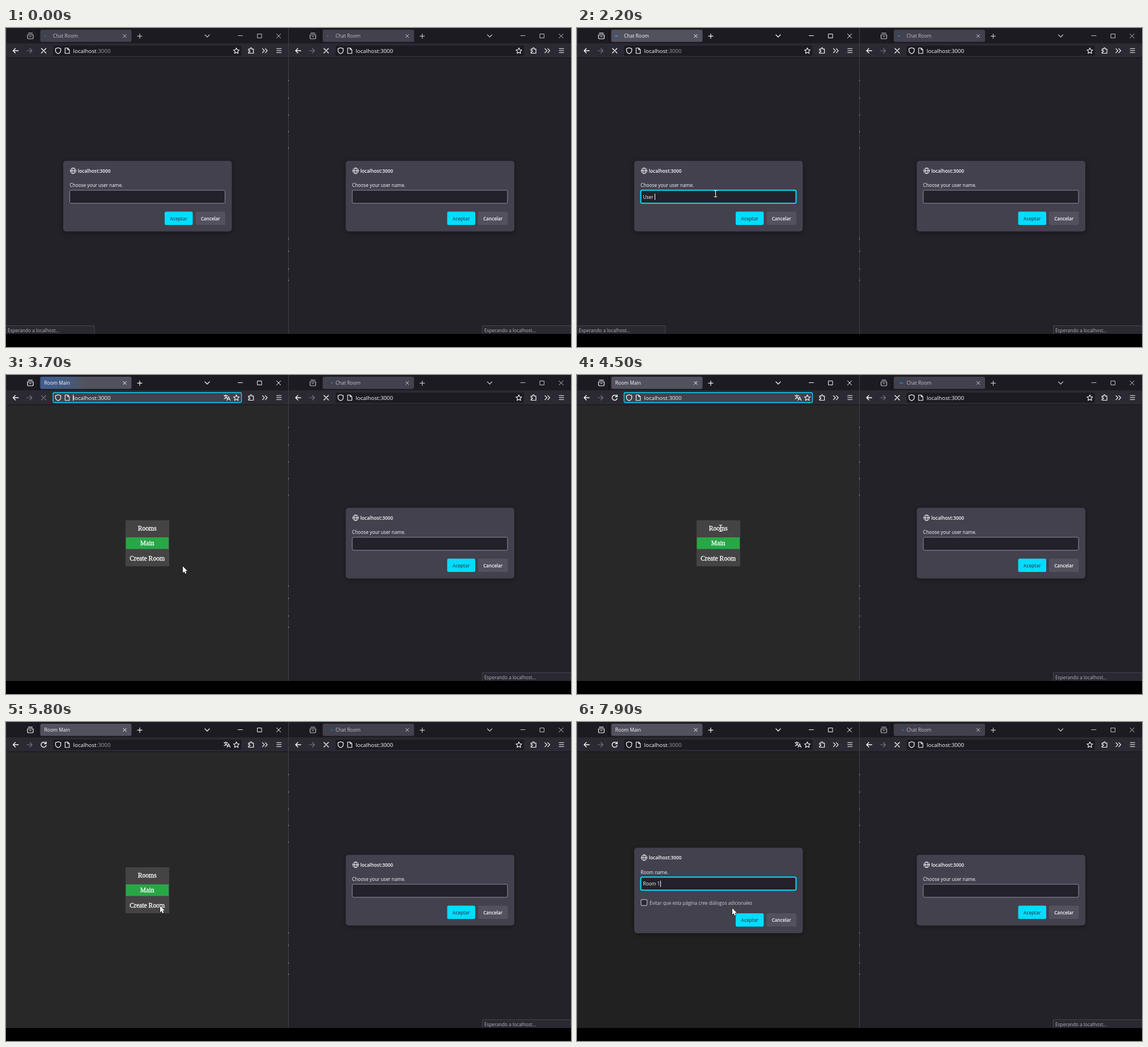
Recreate the animation shown at these times as an HTML page with a canvas. Size 997 by 562 pixels, loop 8000 ms.

```html
<!DOCTYPE html>
<html lang="en">
<head>
<meta charset="utf-8">
<title>Chat Room</title>
<style>
html, body { margin: 0; width: 100%; height: 100%; overflow: hidden; background: #000; }
canvas { display: block; }
</style>
</head>
<body>
<canvas id="stage" width="997" height="562"></canvas>
<script>
const ctx = document.getElementById('stage').getContext('2d');
const LOOP = 8000, RIGHT = 498.5;
const SANS = '"Open Sans", "Noto Sans", sans-serif', SERIF = '"Liberation Serif", serif';
const WHITE = '#fbfbfe', CYAN = '#00ddff', PANEL = '#42414d';

// Key moments, in ms
const ACTIVE = 1600, ENTER = 3700, IDLE = 4000, BLUR = 5700, PROMPT = 5950;
const userKeys = [['U', 1800], ['s', 1900], ['e', 2000], ['r', 2100], [' ', 2200], ['1', 2400]];
const roomKeys = [['R', 6500], ['o', 6700], ['o', 6800], ['m', 7000], [' ', 7200], ['1', 7500]];
const mousePath = [
  [100, 914, 508], [1000, 585, 308], [1500, 244, 292], [2400, 244, 292], [2800, 314, 342],
  [3300, 314, 342], [3700, 312, 337], [3900, 312, 337], [4350, 253, 270], [4700, 253, 270],
  [5350, 272, 324], [6000, 272, 324], [6500, 274, 328], [8000, 274, 328]
];

function rect(x, y, w, h, fill) {
  ctx.fillStyle = fill;
  ctx.fillRect(x, y, w, h);
}

function box(x, y, w, h, r, fill, line, width = 1) {
  ctx.beginPath();
  ctx.roundRect(x, y, w, h, r);
  if (fill) { ctx.fillStyle = fill; ctx.fill(); }
  if (line) { ctx.strokeStyle = line; ctx.lineWidth = width; ctx.stroke(); }
}

function text(str, x, y, size, color = WHITE, weight = 400, family = SANS, align = 'left') {
  ctx.font = `${weight} ${size}px ${family}`;
  ctx.textAlign = align;
  ctx.fillStyle = color;
  ctx.fillText(str, x, y);
  return ctx.measureText(str).width;
}

function icon(path, x, y, color = WHITE, width = 1.2, fill) {
  const shape = new Path2D(path);
  ctx.save();
  ctx.translate(x, y);
  ctx.lineWidth = width;
  ctx.lineCap = ctx.lineJoin = 'round';
  ctx.strokeStyle = color;
  ctx.stroke(shape);
  if (fill) { ctx.fillStyle = fill; ctx.fill(shape); }
  ctx.restore();
}

const CROSS = 'M-4-4L4 4M4-4L-4 4';
const SMALL_CROSS = 'M-2.7-2.7L2.7 2.7M2.7-2.7L-2.7 2.7';
const ARROW_LEFT = 'M4.7 0H-4.5M-.5-4L-4.5 0-.5 4';
const ARROW_RIGHT = 'M-4.7 0H4.5M.5-4L4.5 0 .5 4';
const RELOAD = 'M4.3 1.2A4.5 4.5 0 1 1 3.4-3M4.4-5V-1.6H1';
const SHIELD = 'M0-5.2L4.6-3.6V-.5C4.6 2.5 2.4 4.4 0 5.3-2.4 4.4-4.6 2.5-4.6-.5V-3.6Z';
const PAGE = 'M-3.7-4.8H.8L3.8-1.8V4.8H-3.7ZM.8-4.8V-1.8H3.8';
const STAR = 'M0-5L1.5-1.7 5.1-1.3 2.4 1.1 3.2 4.7 0 2.9-3.2 4.7-2.4 1.1-5.1-1.3-1.5-1.7Z';
const PUZZLE = 'M-4.3-2.7H-1.4V-3.5A1.4 1.4 0 0 1 1.4-3.5V-2.7H4.3V4.7H-4.3V2.6H-3.2A1.4 1.4 0 0 0-3.2-.2H-4.3Z';
const GLOBE = 'M-5 0A5 5 0 1 1 5 0A5 5 0 1 1-5 0H5M0-5C-3.2-2-3.2 2 0 5C3.2 2 3.2-2 0-5';
const TRANSLATE = 'M-5.5-3.6H1.3M-2.2-5V-3.6M.2-3.4C-.5-.8-2.8 1.3-5.2 2.2M-4.2-3.2C-3.2-.8-1.6.7.2 1.5M0 5L2.8-1.6 5.6 5M1 2.9H4.7';
const POINTER = 'M0 0V11.4L2.6 9.1 4.3 13 6.3 12.1 4.6 8.3H8.1Z';
const IBEAM = 'M-2.5-5.5H2.5M0-5.5V5.5M-2.5 5.5H2.5';

const typed = (keys, t) => keys.filter(k => t >= k[1]).map(k => k[0]).join('');
const caretOn = (t, since) => (t - since) % 1000 < 500;
const lastKey = (keys, t, start) => keys.reduce((m, k) => t >= k[1] ? k[1] : m, start);

function throbber(t, color) {
  const a = t / 1050 * 2 * Math.PI;
  const w = 2.4 + 4.4 * Math.abs(Math.sin(a));
  box(72.8 - 4 * Math.cos(a) - w / 2, 12.8, w, 2.4, 1.2, color);
}

function chrome(t, s) {
  rect(0, 0, 498.5, 27, '#1c1b22');
  rect(0, 27, 498.5, 25, '#2b2a33');
  rect(0, 52, 498.5, 1, '#15141a');
  rect(56, 0, 1, 27, '#0f0e14');

  const soft = s.active ? WHITE : '#c2c2c9';
  icon('M-5-2H5V3.6Q5 5 3.6 5H-3.6Q-5 5-5 3.6ZM-3.6-4.8H3.6M-1.6 1H1.6', 43, 14, soft);
  box(60.5, 3, 161, 21.5, 3, s.active ? '#52525e' : PANEL);
  if (s.loading) {
    throbber(t, s.active ? '#2f8cff' : '#1677c2');
    text('Chat Room', 83, 17.3, 8.5, s.active ? WHITE : '#c3c3ca');
  } else {
    const glow = Math.max(0, 1 - (t - ENTER) / 350);
    const fade = ctx.createLinearGradient(61, 0, 140, 0);
    fade.addColorStop(0, `rgba(45,105,190,${.5 * glow})`);
    fade.addColorStop(.6, `rgba(45,105,190,${.35 * glow})`);
    fade.addColorStop(1, 'rgba(45,105,190,0)');
    box(60.5, 3, 161, 21.5, 3, fade);
    text('Room Main', 67.5, 17.3, 8.5);
  }
  icon(SMALL_CROSS, 209.5, 14, soft, 1);
  icon('M-4 0H4M0-4V4', 236, 14.3, soft);
  icon('M-4-2L0 2 4-2', 355, 14, soft);
  icon('M-4 0H4', 413.5, 13.5, soft, 1);
  icon('M-3.5-3.5H3.5V3.5H-3.5Z', 447.5, 14, soft, 1);
  icon('M-3.7-3.7L3.7 3.7M3.7-3.7L-3.7 3.7', 481, 14, soft, 1);

  icon(ARROW_LEFT, 17, 40, WHITE, 1.4);
  icon(ARROW_RIGHT, 41.5, 40, '#74737d', 1.2);
  if (s.loading) icon(CROSS, 66.5, 40, WHITE, 1.4);
  else if (t < IDLE) icon(CROSS, 66.5, 40, '#77767f', 1.2);
  else icon(RELOAD, 66.5, 40, WHITE, 1.4);

  if (s.urlFocus) box(83, 31, 332.5, 17.5, 2.5, PANEL, CYAN, 1.3);
  else box(83, 31, 332.5, 18, 2.5, '#1c1b22');
  icon(SHIELD, 92, 40);
  icon(PAGE, 108, 40, WHITE, 1.1);
  const hostWidth = text('localhost', 118.5, 43.5, 9.8);
  text(':3000', 118.5 + hostWidth, 43.5, 9.8, s.dimPort ? '#9b9aa4' : WHITE);
  if (s.urlFocus && caretOn(t, ENTER)) rect(118, 34.5, 1, 11, WHITE);
  if (!s.loading) icon(TRANSLATE, 390, 39.8, WHITE, 1.1);
  icon(STAR, 406.5, 40, WHITE, 1.1);
  icon(PUZZLE, 432.3, 39.8);
  icon('M-4.2-3.6L-.7 0-4.2 3.6M.8-3.6L4.3 0 .8 3.6', 456.7, 40);
  icon('M-4-3.5H4M-4 0H4M-4 3.5H4', 481.7, 39.8, WHITE, 1.1);
}

function button(label, x, y, w, fill, color) {
  box(x, y, w, 23.5, 2.5, fill);
  text(label, x + w / 2, y + 15.2, 8.1, color, 600, SANS, 'center');
}

function dialog(t, d) {
  const y = d.y;
  ctx.save();
  ctx.shadowColor = 'rgba(0,0,0,.4)';
  ctx.shadowBlur = 9;
  ctx.shadowOffsetY = 2;
  box(101, y, 297.5, d.h, 5, PANEL);
  ctx.restore();
  icon(GLOBE, 118.5, y + 17.5, WHITE, 1);
  text('localhost:3000', 126.7, y + 20.8, 8.35, WHITE, 600);
  text(d.label, 112.3, y + 46.3, 8.26);
  box(112.5, y + 51.8, 274, 23, 2.5, '#23222b', d.focus ? CYAN : '#8f8f9d', d.focus ? 2 : 1);
  if (d.focus) {
    const value = typed(d.keys, t);
    const w = text(value, 116.5, y + 66.7, 8.3);
    if (caretOn(t, lastKey(d.keys, t, d.since))) rect(Math.round(116.8 + w), y + 58, 1, 11, WHITE);
  }
  if (d.check) {
    box(113, y + 91.3, 10.5, 10.5, 1.5, '#2b2a33', '#b6b5c0', 1.2);
    text('Evitar que esta página cree diálogos adicionales', 128, y + 100, 8.2, '#cfcfd6');
  }
  const by = y + d.h - 35;
  button('Aceptar', 280, by, 49.5, d.hover ? '#80ebff' : CYAN, d.hover ? '#2b3b48' : '#2f4b5a');
  button('Cancelar', 334.5, by, 52.5, '#52515d', WHITE);
}

function status(x) {
  box(x - .5, 524.5, 156.5, 15, 0, '#2a2932', '#45444f');
  text('Esperando a localhost...', x + 3, 535.6, 8.25, '#b3b2ba');
}

function menu() {
  rect(211, 256, 77, 81, '#444444');
  rect(211.5, 286, 75.5, 20.5, '#28a745');
  [['Rooms', 273.8], ['Main', 300.2], ['Create Room', 326.6]].forEach(([label, y]) => {
    text(label, 249.2, y, 11.7, '#fff', 400, SERIF, 'center');
    ctx.strokeStyle = '#fff';
    ctx.lineWidth = .3;
    ctx.strokeText(label, 249.2, y);
  });
}

function mouse(t) {
  if (t < mousePath[0][0]) return;
  const i = Math.max(1, mousePath.findIndex(p => p[0] > t));
  const [t0, x0, y0] = mousePath[i - 1], [t1, x1, y1] = mousePath[i];
  const k = (t - t0) / (t1 - t0), e = k * k * (3 - 2 * k);
  const x = x0 + (x1 - x0) * e, y = y0 + (y1 - y0) * e;
  const overField = t < ENTER && x > 112 && x < 387 && y > 285 && y < 309;
  const overTitle = t > ENTER && t < PROMPT && x > 232 && x < 267 && y > 263 && y < 277;
  if (overField || overTitle) icon(IBEAM, Math.round(x) + .5, y, WHITE, 1.1);
  else icon(POINTER, x, y, '#111', 1.2, '#fff');
}

function draw(t) {
  const loading = t < ENTER, active = t >= ACTIVE;
  const urlFocus = !loading && t < BLUR;
  rect(0, 0, 997, 562, '#000');

  rect(0, 53, 498.5, 486, loading ? '#232229' : t < PROMPT ? '#282828' : '#212122');
  chrome(t, { active, loading, urlFocus, dimPort: !urlFocus });
  if (loading) {
    dialog(t, {
      y: 234, h: 124.5, label: 'Choose your user name.', focus: active,
      keys: userKeys, since: ACTIVE, hover: t >= 2650
    });
    status(0);
  } else if (t < PROMPT) {
    menu();
  } else {
    dialog(t, {
      y: 221.5, h: 150.5, label: 'Room name.', focus: true,
      keys: roomKeys, since: PROMPT, check: true
    });
  }
  rect(0, 0, 1, 539, '#34333b');

  ctx.save();
  ctx.translate(RIGHT, 0);
  rect(0, 53, 498.5, 486, '#232229');
  chrome(t, { active: false, loading: true });
  dialog(t, { y: 234, h: 124.5, label: 'Choose your user name.' });
  ctx.restore();
  status(841);
  rect(498, 0, 1, 539, '#414047');
  [92, 123, 153, 182, 211, 371, 393, 424, 444].forEach(y => rect(498, y - 1, 1, 3, '#85848b'));
  rect(0, 539, 997, 23, '#000');
  mouse(t);
}

function tick() {
  draw(performance.now() % LOOP);
  requestAnimationFrame(tick);
}
tick();
</script>
</body>
</html>
```
